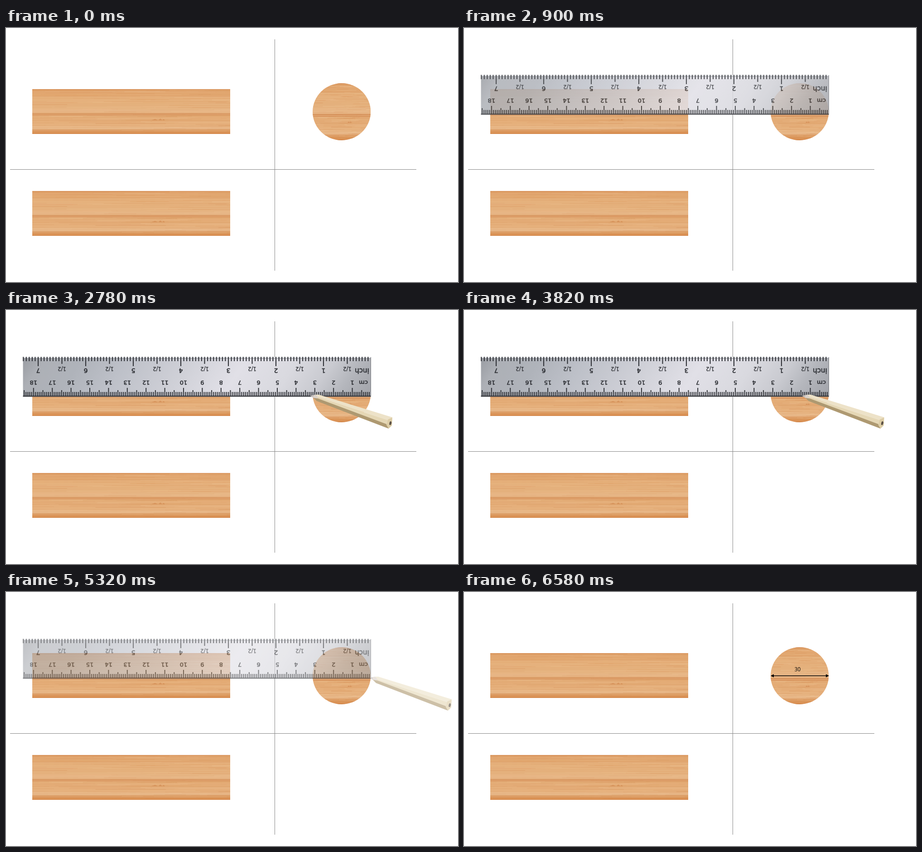
An HTML page that plays this animation: 998 by 561 pixels, repeating every 6950 ms.

```html
<!DOCTYPE html>
<html lang="en">
<head>
<meta charset="utf-8">
<title>Measuring a round bar</title>
<style>
  html, body { margin: 0; width: 100%; height: 100%; overflow: hidden; background: #fff; }
  svg { display: block; width: 100%; height: 100%; }
  .ruler text { font: 14px "DejaVu Sans", sans-serif; text-anchor: middle; fill: #2f3136; stroke: #2f3136; stroke-width: .6; }
  .ruler .half { font-size: 11.5px; stroke-width: .3; }
  .ruler .cm { font-size: 13px; }
  .ruler .unit { font-size: 15px; }
</style>
</head>
<body>
<svg viewBox="0 0 998 561">
  <defs>
    <linearGradient id="board" x2="0" y2="1">
      <stop offset="0" stop-color="#dc9c62"/>
      <stop offset=".05" stop-color="#e1a56e"/>
      <stop offset=".15" stop-color="#e2a972"/>
      <stop offset=".22" stop-color="#e5b07b"/>
      <stop offset=".4" stop-color="#e4b07c"/>
      <stop offset=".5" stop-color="#e7b686"/>
      <stop offset=".6" stop-color="#e3ab75"/>
      <stop offset=".8" stop-color="#e6b17d"/>
      <stop offset=".88" stop-color="#e7b788"/>
      <stop offset=".92" stop-color="#dfa067"/>
      <stop offset="1" stop-color="#d78b4c"/>
    </linearGradient>
    <linearGradient id="steel" gradientUnits="userSpaceOnUse" x1="38" y1="104" x2="608" y2="486">
      <stop offset="0" stop-color="#999ca2"/>
      <stop offset=".06" stop-color="#adb0b6"/>
      <stop offset=".16" stop-color="#afb3ba"/>
      <stop offset=".28" stop-color="#bdc0c8"/>
      <stop offset=".45" stop-color="#cfd0d7"/>
      <stop offset=".6" stop-color="#e1e0e7"/>
      <stop offset=".74" stop-color="#d9d9df"/>
      <stop offset=".84" stop-color="#c9cad0"/>
      <stop offset=".91" stop-color="#b4b6bc"/>
      <stop offset="1" stop-color="#a1a3a9"/>
    </linearGradient>
    <clipPath id="plank"><rect width="437" height="99"/></clipPath>
    <clipPath id="disc"><ellipse cx="218.5" cy="49.5" rx="218.5" ry="49.5"/></clipPath>
    <g id="wood"></g>
  </defs>

  <rect width="998" height="561" fill="#fff"/>
  <path d="M593.5 25V536M9 312.5H906" stroke="#868686"/>
  <g transform="translate(58 135)"><use href="#wood" clip-path="url(#plank)"/></g>
  <g transform="translate(58 360)"><use href="#wood" clip-path="url(#plank)"/></g>
  <g transform="translate(677 122) scale(.2936 1.2727)"><use href="#wood" clip-path="url(#disc)"/></g>

  <g id="size">
    <path d="M682 185H801" stroke="#000" stroke-width="1.4"/>
    <path d="M677 185l7-3.5v7zM806 185l-7-3.5v7z"/>
    <text x="736.5" y="175.3" text-anchor="middle" font-family="'Open Sans', Lato, sans-serif" font-size="11.8">30</text>
  </g>

  <g id="ruler" class="ruler"></g>

  <g id="pencil">
    <path d="M672 189.500L683 187L692 187.500L688 200.500Z" fill="#dcd3ca"/>
    <path d="M672 189.500L679 188L678.500 193.500Z" fill="#c3bdba"/>
    <path d="M684 187L691 187L853 237L843 243L689 193Z" fill="#ede2c8"/>
    <path d="M689 193L843 243L840 254L686 198Z" fill="#e5d7b5"/>
    <path d="M679 194L689 195.500L840 252L845 262L686 201Z" fill="#ae9971"/>
    <path d="M853 237L852 255L845 262L840 254L843 242Z" fill="#ddcda6"/>
    <ellipse cx="848.800" cy="250" rx="2.300" ry="4.200" fill="#5c5145" transform="rotate(14 848.800 250)"/>
  </g>
</svg>
<script>
const LOOP = 6950, STEP = 40;
const $ = id => document.getElementById(id);

function makeWood() {
  let seed = 7;
  const rnd = () => (seed = seed * 16807 % 2147483647) / 2147483647;
  const streak = (x, y, len, h, color, alpha) =>
    `<rect x="${x.toFixed(1)}" y="${y.toFixed(1)}" width="${len.toFixed(1)}" height="${h}" fill="${color}" opacity="${alpha.toFixed(2)}"/>`;
  const tones = ['#cb7d44', '#d88f57', '#f1cfa6', '#eec497'];
  let s = '<rect width="437" height="99" fill="url(#board)"/>';
  for (let i = 0; i < 190; i++) {
    const len = 40 + rnd() * 240;
    s += streak(rnd() * 520 - 90, rnd() * 98, len, rnd() < .7 ? .7 : 1.2, tones[i % 4], .1 + rnd() * .22);
  }
  // strong grain lines across the whole board: y, height, tone, opacity
  [[0, 1, 0, .5], [3, .8, 0, .3], [15, 1, 0, .35], [16.5, 1, 2, .4], [53.5, 1.3, 0, .7], [55, 1.6, 1, .4],
   [57, 1, 0, .65], [69, .8, 0, .3], [80, .8, 0, .3], [89.5, 1, 0, .4], [93, 1, 0, .3], [98, 1, 0, .6]]
    .forEach(([y, h, c, a]) => s += streak(0, y, 437, h, tones[c], a));
  s += '<path d="M263 69l8-3 7 3zM278 69l5-4 4 4zM287 69l3-3 3 3z" fill="#cb7d44" opacity=".5"/>';
  $('wood').innerHTML = s;
}

function makeRuler() {
  const left = 38, zero = 806, inch = 105, cm = 41.4;
  const label = (x, y, text, cls) => `<text class="${cls}" transform="translate(${x} ${y}) rotate(180)">${text}</text>`;
  let top = '', bottom = '', labels = '';
  for (let i = 1; zero - i * inch / 16 > left; i++) {
    const h = i % 16 == 0 ? 20.5 : i % 8 == 0 ? 15.5 : 9.5;
    top += `M${(zero - i * inch / 16).toFixed(1)} 103.5v${h}`;
  }
  for (let i = 1; zero - i * cm / 10 > left; i++) {
    const h = i % 10 == 0 ? 19 : i % 5 == 0 ? 14 : 10;
    bottom += `M${(zero - i * cm / 10).toFixed(1)} 191v${-h}`;
  }
  for (let n = 1; n <= 7; n++) {
    labels += label(zero - n * inch, 129, n, '') + label(zero - (n - .5) * inch, 126, '1/2', 'half');
  }
  for (let n = 1; n <= 18; n++) labels += label((zero - n * cm).toFixed(1), 156, n, 'cm');
  labels += label(786, 129, 'inch', 'unit') + label(789, 156, 'cm', 'cm');
  $('ruler').innerHTML = `
    <rect x="37.500" y="104" width="768.500" height="87.500" fill="url(#steel)"/>
    <path d="M37.500 105.200H806" stroke="#e3e5e9" stroke-width="2.400"/>
    <path d="M37.500 107H806" stroke="#85888e"/>
    <path d="M37.500 190.200H806" stroke="#46484d" stroke-width="2.500"/>
    <path d="M805.500 104V191" stroke="#74767b"/>
    <path d="${top}" stroke="#303237" stroke-width="2.100"/>
    <path d="${bottom}" stroke="#303237" stroke-width="2"/>${labels}`;
}

// number of steps done since start, 0 to n
const steps = (t, start, n) => Math.max(0, Math.min(n, Math.floor((t - start) / STEP) + 1));
const part = (t, start, n) => steps(t, start, n) / n;
const ease = u => u < .5 ? .5 * (2 * u) ** 2.45 : 1 - .5 * (2 - 2 * u) ** 2.45;

function draw(t) {
  const out = 1 - part(t, 5160, 13);
  const enter = part(t, 1400, 25);
  const k = steps(t, 2780, 50);
  const dx = 131 * ease(k == 50 ? 1 : Math.max(0, k - .5) / 50);
  const wide = .7 + .3 * ease(enter);

  $('ruler').setAttribute('opacity', part(t, 500, 13) * out);
  $('pencil').setAttribute('opacity', enter * out);
  $('pencil').setAttribute('transform', `translate(${762 + dx} 0) scale(${wide} 1) translate(-762 0)`);
  $('size').setAttribute('opacity', part(t, 6140, 12));
}

makeWood();
makeRuler();
const begin = performance.now();
function frame() {
  draw((performance.now() - begin) % LOOP);
  requestAnimationFrame(frame);
}
frame();
</script>
</body>
</html>
```
